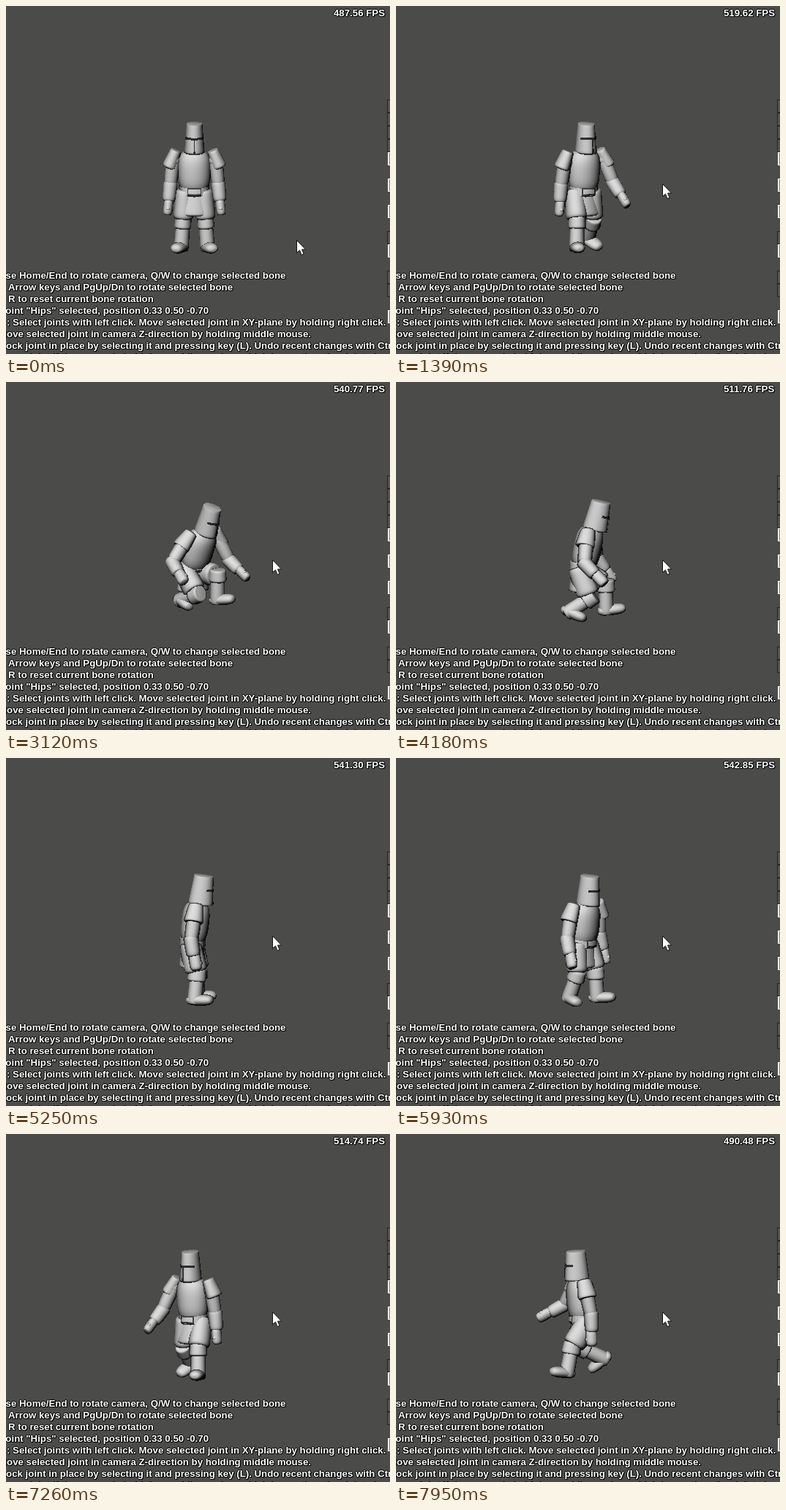
These frames come from a looping animation (525 px wide and 476 px high, 8000 ms). An HTML page with a canvas:

```html
<!DOCTYPE html>
<html lang="en">
<head>
<meta charset="utf-8">
<title>Skeleton viewer</title>
<style>
  html, body { margin: 0; width: 100%; height: 100%; overflow: hidden; background: #4b4b49; }
  body { position: relative; }
  body > * { position: absolute; }
  .text {
    font: bold 13.25px/16px "Liberation Sans", Arial, sans-serif;
    color: #fff; white-space: pre;
    text-shadow: 1px 0 #000, -1px 0 #000, 0 1px #000, 0 -1px #000, 1px 1px #000;
  }
  #knight { left: 165px; top: 140px; }
  #cursor { left: 0; top: 0; }
  .button, .field { left: 521px; width: 10px; height: 18px; box-sizing: border-box; }
  .button { border: 1px solid #262626; background: #535351; }
  .field { border: solid #fff; border-width: 1px 0 1px 2px; margin-left: 1px; background: #777; }
</style>
</head>
<body>
<canvas id="knight" width="200" height="220"></canvas>
<div id="fps" class="text" style="left:448px;top:2px"></div>
<svg id="cursor" width="14" height="22"><path d="M.5.5V17.5L4.5 14 7 20.5 10 19 7.5 13H12.5Z" fill="#fff" stroke="#111"/></svg>
<script>
const { sin, cos, abs, PI, min, max, floor, ceil, hypot, sign } = Math;
const LOOP = 8000;
const WIDTH = 200, HEIGHT = 220, LEFT = 165, TOP = 140;
const LIGHT = [-0.18, -0.4, 0.9];

// stride > 0 puts the right leg forward; crouch 1 is kneeling.
const keys = [
  { t: 0, yaw: 0, stride: 0, crouch: 0, fps: 487.56 },
  { t: 1390, yaw: 25, stride: 0.6, crouch: 0, fps: 519.62 },
  { t: 2560, yaw: 30, stride: 0, crouch: 0, fps: 531.4 },
  { t: 3120, yaw: 42, stride: -0.6, crouch: 1, fps: 540.77 },
  { t: 4180, yaw: 80, stride: -0.6, crouch: 0.55, fps: 511.76 },
  { t: 5250, yaw: 85, stride: 0, crouch: 0.22, fps: 541.30 },
  { t: 6660, yaw: 10, stride: -0.7, crouch: 0, fps: 517.58 },
  { t: 7950, yaw: -75, stride: -1, crouch: 0, fps: 490.48 },
];

const lerp = (a, b, u) => a + (b - a) * u;
const smooth = u => u * u * (3 - 2 * u);
const clamp = u => max(0, min(1, u));
const rotX = (m, a) => m.rotateAxisAngle(1, 0, 0, a);
const rotY = (m, a) => m.rotateAxisAngle(0, 1, 0, a);
const rotZ = (m, a) => m.rotateAxisAngle(0, 0, 1, a);
const turn = (m, x, y, z) => [
  m.m11 * x + m.m21 * y + m.m31 * z,
  m.m12 * x + m.m22 * y + m.m32 * z,
  m.m13 * x + m.m23 * y + m.m33 * z,
];

const ctx = document.getElementById("knight").getContext("2d");
const image = ctx.createImageData(WIDTH, HEIGHT);
const depth = new Float32Array(WIDTH * HEIGHT);
const shade = new Float32Array(WIDTH * HEIGHT);
const owner = new Uint8Array(WIDTH * HEIGHT);
let part = 0;

function triangle(a, b, c) {
  const area = (b.x - a.x) * (c.y - a.y) - (b.y - a.y) * (c.x - a.x);
  if (!area) return;
  const right = min(WIDTH - 1, floor(max(a.x, b.x, c.x)));
  const bottom = min(HEIGHT - 1, floor(max(a.y, b.y, c.y)));
  for (let y = max(0, ceil(min(a.y, b.y, c.y))); y <= bottom; y++) {
    for (let x = max(0, ceil(min(a.x, b.x, c.x))); x <= right; x++) {
      const u = ((b.x - x) * (c.y - y) - (b.y - y) * (c.x - x)) / area;
      const v = ((c.x - x) * (a.y - y) - (c.y - y) * (a.x - x)) / area;
      const w = 1 - u - v;
      if (u < 0 || v < 0 || w < 0) continue;
      const z = u * a.z + v * b.z + w * c.z, i = y * WIDTH + x;
      if (z <= depth[i]) continue;
      depth[i] = z;
      shade[i] = u * a.light + v * b.light + w * c.light;
      owner[i] = part;
    }
  }
}

// Tapered superellipsoid along y. Higher power is boxier; flat is depth / width;
// arc limits it to a plate (90 degrees = front).
function blob(m, y0, y1, r0, r1, { flat = 1, power = 4, tone = 1, arc = [0, 360] } = {}) {
  const rings = 14, sides = 24;
  part++;
  const profile = i => {
    const v = -cos(PI * clamp(i / rings));
    const end = sign(v) * abs(v);
    return { y: lerp(y0, y1, (end + 1) / 2),
      r: lerp(r0, r1, (end + 1) / 2) * max(0, 1 - abs(v) ** power) ** (1 / power) };
  };
  const grid = Array.from({ length: rings + 1 }, (_, i) => {
    const { y, r } = profile(i), p = profile(i - 1), q = profile(i + 1);
    const dy = q.y - p.y, dr = q.r - p.r;
    return Array.from({ length: sides + 1 }, (_, k) => {
      const a = lerp(...arc, k / sides) * PI / 180, c = cos(a), s = sin(a);
      const at = turn(m, r * c, y, r * flat * s);
      const n = turn(m, c * dy, -dr, s * dy / flat);
      const dot = (n[0] * LIGHT[0] + n[1] * LIGHT[1] + n[2] * LIGHT[2]) / (hypot(...n) || 1);
      return { x: at[0] + m.m41, y: at[1] + m.m42, z: at[2] + m.m43,
        light: tone * (10 + 212 * max(0, dot)) };
    });
  });
  for (let i = 0; i < rings; i++) {
    for (let k = 0; k < sides; k++) {
      const a = grid[i][k], b = grid[i][k + 1], c = grid[i + 1][k], d = grid[i + 1][k + 1];
      triangle(a, b, c);
      triangle(b, d, c);
    }
  }
}

function head(m) {
  const helmet = { flat: 1.22, power: 24 };
  blob(m, -38, 3, 11, 14, helmet);
  blob(m, -20, -17, 13.2, 13.4, { ...helmet, tone: 0.25, arc: [25, 155] });
  blob(m, -18, 3, 13.3, 14.6, { ...helmet, tone: 0.25, arc: [86, 94] });
}

function trunk(torso, pelvis) {
  blob(torso, -64, -2, 23, 22, { flat: 0.85, power: 3 });
  blob(torso, -70, -50, 10, 14);
  blob(pelvis, -14, 0, 20, 20.5, { flat: 0.85, power: 20 });
  blob(pelvis, -12, -1, 21, 21.5, { flat: 0.86, power: 20, tone: 0.35, arc: [63, 117] });
  blob(pelvis, -10, -3, 21.5, 22, { flat: 0.86, power: 20, arc: [67, 113] });
  blob(pelvis, -4, 27, 19, 25, { flat: 0.75, power: 14 });
}

function arm(torso, side, forward, crouch) {
  const ahead = max(0, forward), behind = max(0, -forward);
  const swing = 20 * ahead + behind * lerp(-8, 55, crouch);
  const spread = 6 + 22 * ahead + 20 * crouch;
  const bend = 10 + 30 * ahead + 30 * crouch;
  const joint = torso.translate(side * 29, -50, 0);
  const pad = rotX(rotZ(joint.translate(side, 0, 0), -side * (18 + spread / 2)), swing / 2);
  blob(pad, -14, 12, 7.5, 10.5, { flat: 1.25, power: 10 });
  blob(joint, -10, 12, 10, 10, { power: 2 });
  const upper = rotX(rotZ(joint, -side * spread), swing);
  blob(upper, -8, 42, 10, 9);
  const lower = rotX(upper.translate(0, 36, 0), bend);
  blob(lower, -6, 23, 10, 9, { power: 6 });
  const hand = lower.translate(0, 22, 1);
  blob(hand, -3, 20, 6.5, 6.5, { flat: 1.2 });
  blob(rotX(hand, 28), 1, 15, 3, 3);
}

function leg(pelvis, side, forward, crouch) {
  const ahead = max(0, forward), behind = max(0, -forward), lead = (1 + forward) / 2;
  const swing = 32 * ahead - 8 * behind + crouch * lerp(40, 75, lead);
  const bend = 20 * ahead + 55 * behind + 80 * crouch;
  const ankle = 0.3 * (bend - swing) + 40 * crouch * (1 - lead);
  const thigh = rotX(rotZ(pelvis.translate(side * 13, 2, 0), -side * 4), swing);
  blob(thigh, -10, 31, 13, 14.5, { flat: 1.1, power: 8 });
  const knee = rotX(thigh.translate(0, 36, 0), -bend);
  blob(knee, -9, 8, 11, 12, { flat: 1.1, power: 8 });
  blob(knee, -6, 40, 9.5, 10.5, { power: 8 });
  const foot = rotX(rotY(knee.translate(0, 34, 0), side * 18), ankle + 90);
  blob(foot, -12, 27, 10, 10, { flat: 0.75, power: 3 });
}

function drawKnight({ yaw, stride, crouch }) {
  depth.fill(-1e6);
  part = 0;
  const turned = yaw * PI / 180;
  const x = 257 - 3 * abs(sin(turned));
  const camera = rotX(new DOMMatrix().translate(x - LEFT, 258 - TOP, 0), -8);
  const pelvis = rotY(camera, yaw);
  const torso = rotX(pelvis, -3 - 18 * crouch);
  trunk(torso, pelvis);
  head(rotY(torso.translate(0, -63, 4), 10 * sin(2 * turned)));
  for (const side of [-1, 1]) {
    arm(torso, side, side * stride, crouch);
    leg(pelvis, side, -side * stride, crouch);
  }
  for (let i = 0; i < depth.length; i++) {
    // Dark crease where another part stands in front.
    const crease = [1, -1, WIDTH, -WIDTH].some(step =>
      owner[i + step] !== owner[i] && depth[i + step] > depth[i] + 2);
    const grey = shade[i] * (crease ? 0.35 : 1);
    image.data.set([grey, grey, grey, depth[i] > -1e5 ? 255 : 0], i * 4);
  }
  ctx.putImageData(image, 0, 0);
}

// Finds the surrounding keys, with time measured by the given clock.
function between(t, clock = v => v) {
  const i = max(0, keys.findLastIndex(k => clock(k.t) <= clock(t)));
  const a = keys[i], b = keys[i + 1] || a;
  return { a, b, u: a === b ? 0 : (clock(t) - clock(a.t)) / (clock(b.t) - clock(a.t)) };
}

function poseAt(t) {
  const { a, b, u } = between(t);
  const mix = name => lerp(a[name], b[name], smooth(u));
  const crouch = mix("crouch");
  const steps = 0.6 * (1 - crouch) * sin(2 * PI * u);
  return { yaw: mix("yaw"), crouch, stride: max(-1, min(1, mix("stride") + steps)) };
}

const tick = t => floor((t + 12) / 60.6);

function fpsAt(t) {
  const { a, b, u } = between(t, tick);
  return lerp(a.fps, b.fps, u) + 14 * sin(tick(t) * 12.9) * sin(PI * u);
}

function add(className, top, left, text = "") {
  const el = document.createElement("div");
  el.className = className;
  el.textContent = text;
  el.style.top = top + "px";
  if (left !== undefined) el.style.left = left + "px";
  document.body.append(el);
}

[
  [-10, "Use Home/End to rotate camera, Q/W to change selected bone"],
  [3, "Arrow keys and PgUp/Dn to rotate selected bone"],
  [3, "R to reset current bone rotation"],
  [-8, 'Joint "Hips" selected, position 0.33 0.50 -0.70'],
  [1, ": Select joints with left click. Move selected joint in XY-plane by holding right click."],
  [-10, "Move selected joint in camera Z-direction by holding middle mouse."],
  [-8, "Lock joint in place by selecting it and pressing key (L). Undo recent changes with Ctrl+Z"],
  [-8, "a new joint if the mouse is held down while moving, which keeps the other joints in place"],
].forEach(([left, text], i) => add("text", 361 + i * 16, left, text));

// One letter per 18px row of the side panel: button, field or gap.
[..."bbbbf-f-f-bf-bb-f"].forEach((kind, i) => {
  if (kind !== "-") add(kind === "b" ? "button" : "field", 128 + i * 18);
});

const cursor = document.getElementById("cursor"), fps = document.getElementById("fps");

function frame() {
  const t = performance.now() % LOOP;
  drawKnight(poseAt(t));
  fps.textContent = fpsAt(t).toFixed(2) + " FPS";
  const u = smooth(clamp((t - 100) / 600));
  cursor.style.transform = `translate(${lerp(397, 364, u)}px, ${lerp(320, 243, u)}px)`;
  requestAnimationFrame(frame);
}
frame();
</script>
</body>
</html>
```
